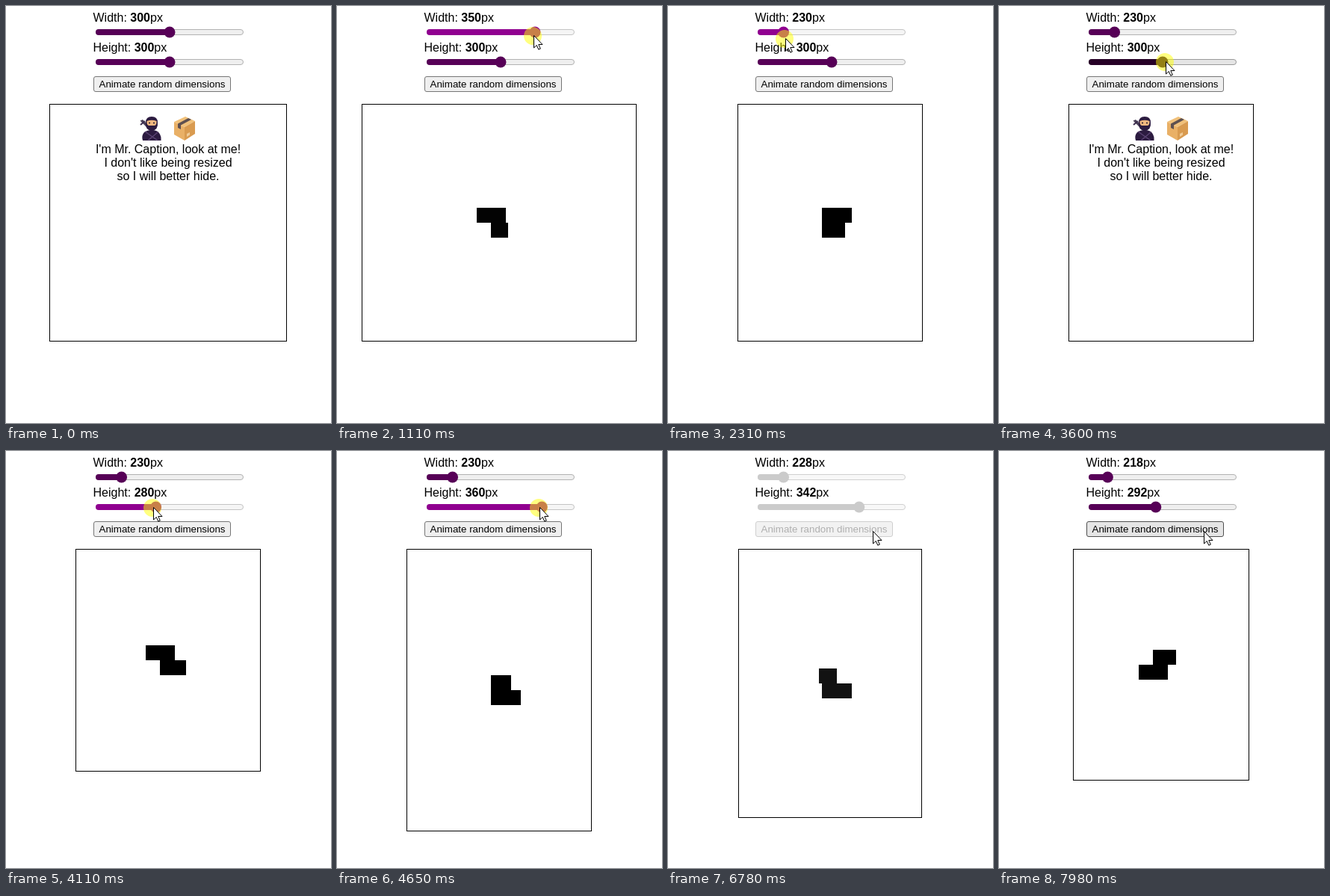
Write an HTML page that moves like this. It is 435 by 558 pixels and loops after 8 s.

```html
<!DOCTYPE html>
<html lang="en">
<head>
<meta charset="utf-8">
<title>Resizing content</title>
<style>
  html, body { margin: 0; width: 100%; height: 100%; overflow: hidden; background: #fff; }
  svg { display: block; width: 100vw; height: 100vh; }
  text { font: 16px "Liberation Sans", Arial, sans-serif; white-space: pre; }
  .num { font-weight: bold; }
  #button text { font-size: 13.333px; }
  .mid { text-anchor: middle; }
</style>
</head>
<body>
<svg viewBox="0 0 435 558">
  <text x="116.5" y="21">Width: <tspan class="num" id="wNum"></tspan>px</text>
  <text x="116.5" y="61">Height: <tspan class="num" id="hNum"></tspan>px</text>
  <g id="wSlider"></g>
  <g id="hSlider"></g>
  <g id="button">
    <rect x="117.5" y="94.5" width="183" height="20" rx="2.5"/>
    <text class="mid" x="209" y="109">Animate random dimensions</text>
  </g>
  <rect id="box" y="131.5" fill="none" stroke="#000"/>
  <g id="content">
    <g id="ninja">
      <path d="M179.500 153.500L183 152L207 176L204 178Z" fill="#4a4058"/>
      <path d="M180 159L186 154" stroke="#3b2c4d" stroke-width="2"/>
      <path d="M183 180Q181 173 185 169Q189 166 195 166Q202 166 205 170Q208 174 207.500 180Z" fill="#2c1b40"/>
      <path d="M187 156Q187 148 195 148Q203 148 203 156Q204 166 195 167Q186 166 187 156Z" fill="#2c1b40"/>
      <path d="M188.500 154Q195 151.500 201.500 154Q202 159 199 160H191Q188 159 188.500 154Z" fill="#f0b77f"/>
      <circle cx="192" cy="156.500" r="1" fill="#21152c"/>
      <circle cx="198" cy="156.500" r="1" fill="#21152c"/>
      <path d="M186 168L203 180M203 169L190 180" stroke="#5b4373" stroke-width="1.500"/>
    </g>
    <g id="parcel">
      <path d="M225 155L240 148L253 154L239 162Z" fill="#f1c17a"/>
      <path d="M225 155L239 162V180L225 172Z" fill="#e9b066"/>
      <path d="M253 154L239 162V180L253 171Z" fill="#d99b50"/>
      <path d="M244 150L248 152L234 159.500V165L230 163V157.500Z" fill="#5e5050"/>
      <path d="M242 175L246 172.500V169L242 171Z" fill="#f0cc98"/>
    </g>
    <text class="mid" x="217" y="197">I'm Mr. Caption, look at me!</text>
    <text class="mid" x="217" y="215">I don't like being resized</text>
    <text class="mid" x="217" y="233">so I will better hide.</text>
  </g>
  <g id="loader"></g>
  <circle id="press" r="12" fill="#ff0" fill-opacity=".5"/>
  <path id="cursor" d="M0 0V16.500L3.800 13L6.300 18.700L8.800 17.600L6.300 12H11.500Z" fill="#fff" stroke="#000"/>
</svg>
<script>
const LOOP = 8000;
const $ = id => document.getElementById(id);
const set = (el, attrs) => { for (const k in attrs) el.setAttribute(k, attrs[k]); };
const make = (parent, tag, attrs) => {
  const el = document.createElementNS("http://www.w3.org/2000/svg", tag);
  set(el, attrs);
  return parent.appendChild(el);
};
const within = (t, [a, b]) => t >= a && t < b;
const clamp = (v, a, b) => Math.min(b, Math.max(a, v));

// Linear interpolation through rows of [time, value, ...].
function track(rows, t, col = 1) {
  if (t <= rows[0][0]) return rows[0][col];
  for (let i = 1; i < rows.length; i++) {
    const a = rows[i - 1], b = rows[i];
    if (t <= b[0]) return a[col] + (b[col] - a[col]) * (t - a[0]) / (b[0] - a[0]);
  }
  return rows[rows.length - 1][col];
}

// Time, x, y of the pointer tip
const pointer = [
  [60, 324, 483], [480, 224, 24], [670, 219, 37], [840, 219, 38],
  [1110, 263, 40], [1250, 272, 41], [1540, 272, 42], [1640, 266, 42],
  [2250, 157, 44], [2480, 157, 44], [2900, 220, 71], [3190, 223, 72],
  [3330, 223, 75], [3620, 223, 75], [4000, 164, 76], [4360, 271, 76],
  [4950, 271, 76], [5060, 258, 76], [5220, 258, 76], [5300, 265, 76],
  [6140, 265, 76], [6280, 274, 108]
];
// Time, width, height while the button's resize runs
const resize = [[6580, 230, 350], [6780, 228, 342], [7390, 222, 314], [7970, 218, 292]];
const wDrag = [840, 2450], hDrag = [3620, 5400], busy = [6580, 7970];
const presses = [wDrag, [3590, 5400], [6580, 6680]];
const hidden = [[860, 2700], [3650, 5550], [6580, LOOP + 300]];
// Loader steps, eight to a cycle
const beat = [[0, 4.1], [1110, 7.15], [2310, 10.45], [4650, 17.35], [6780, 24.8], [7980, 28.45], [8000, 28.51]];

const round10 = v => Math.round(v / 10) * 10;
const thumbX = v => 127 + 0.92 * (round10(v) - 200);
const dragged = (t, span) => {
  const x = track(pointer, clamp(t, ...span));
  return clamp(round10(200 + (x - 127) / 0.92), 200, 400);
};

const looks = {
  normal: ["#570057", "#efefef", "#b2b2b2"],
  hover: ["#260026", "#e5e5e5", "#9a9a9a"],
  active: ["#900090", "#f5f5f5", "#c4c4c4"],
  disabled: ["#cbcbcb", "#f8f8f8", "#d0d0d0"]
};

function slider(id, y) {
  const g = $(id);
  const rail = make(g, "rect", { x: 120.5, y: y - 3.5, width: 197, height: 7, rx: 3.5 });
  const fill = make(g, "rect", { x: 120, y: y - 4, height: 8, rx: 4 });
  const thumb = make(g, "circle", { cy: y, r: 7.5 });
  return (value, look) => {
    const [accent, bg, edge] = looks[look], x = thumbX(value);
    set(rail, { fill: bg, stroke: edge });
    set(fill, { width: x - 120, fill: accent });
    set(thumb, { cx: x, fill: accent });
  };
}
const drawW = slider("wSlider", 35), drawH = slider("hSlider", 75);
const blocks = [0, 1, 2, 3].map(() => make($("loader"), "rect", { width: 20, height: 20 }));

// Columns of a row's two blocks when its gap sits at 0 (left) to 2 (right)
const columns = gap => [clamp(2 - gap, 0, 1), 1 + clamp(1 - gap, 0, 1)]
  .map((c, i) => i ? c : clamp(1 - (gap - 1), 0, 1));

function drawLoader(t, height) {
  const p = track(beat, t) % 8;
  const topGap = p < 4 ? 2 - Math.min(p, 2) : Math.min(p - 4, 2);
  const lowGap = p < 4 ? clamp(p - 2, 0, 2) : 2 - clamp(p - 6, 0, 2);
  const y = 140 + height / 2;
  [...columns(topGap), ...columns(lowGap)].forEach((c, i) =>
    set(blocks[i], { x: 187 + Math.floor(19.5 * c), y: Math.round(i < 2 ? y - 20 : y) }));
}

// CSS "ease" curve
function ease(x) {
  let lo = 0, hi = 1;
  const bez = (s, a, b) => 3 * (1 - s) ** 2 * s * a + 3 * (1 - s) * s * s * b + s ** 3;
  for (let i = 0; i < 16; i++) {
    const m = (lo + hi) / 2;
    if (bez(m, 0.25, 0.25) < x) lo = m; else hi = m;
  }
  return bez(lo, 0.1, 1);
}
const fade = (t, [a, b]) => ease(clamp((t - a) / 300, 0, 1)) * (1 - ease(clamp((t - b) / 300, 0, 1)));

function draw(t) {
  const x = track(pointer, t, 1), y = track(pointer, t, 2);
  const auto = t >= busy[0], off = within(t, busy);
  const w = auto ? Math.round(track(resize, t, 1)) : dragged(t, wDrag);
  const h = auto ? Math.round(track(resize, t, 2)) : dragged(t, hDrag);
  const dragW = within(t, wDrag), dragH = within(t, hDrag);
  const over = (left, right, top, bottom) =>
    t >= 60 && !dragW && !dragH && x >= left && x <= right && y >= top && y <= bottom;
  const look = (drag, mid) => off ? "disabled" : drag ? "active"
    : over(118, 320, mid - 9, mid + 9) ? "hover" : "normal";

  $("wNum").textContent = w;
  $("hNum").textContent = h;
  drawW(w, look(dragW, 35));
  drawH(h, look(dragH, 75));

  const hot = over(117, 301, 94, 115);
  set($("button").children[0], {
    fill: off ? "#f2f2f2" : hot ? "#e5e5e5" : "#efefef",
    stroke: off ? "#cfcfcf" : hot ? "#4f4f4f" : "#767676"
  });
  set($("button").children[1], { fill: off ? "#afafaf" : "#000" });

  set($("box"), { x: 217 - (w + 18) / 2 + 0.5, width: w + 17, height: h + 17 });
  set($("content"), { visibility: hidden.some(s => within(t, s)) ? "hidden" : "visible" });
  set($("loader"), { opacity: Math.max(...hidden.map(s => fade(t, s))) });
  drawLoader(t, h);

  set($("press"), {
    cx: x - 1, cy: y,
    visibility: presses.some(s => within(t, s)) ? "visible" : "hidden"
  });
  set($("cursor"), {
    transform: `translate(${Math.round(x) + 0.5} ${Math.round(y) - 0.5})`,
    visibility: t < 60 ? "hidden" : "visible"
  });
}

const start = performance.now();
function tick() {
  draw((performance.now() - start) % LOOP);
  requestAnimationFrame(tick);
}
draw(0);
requestAnimationFrame(tick);
</script>
</body>
</html>
```
